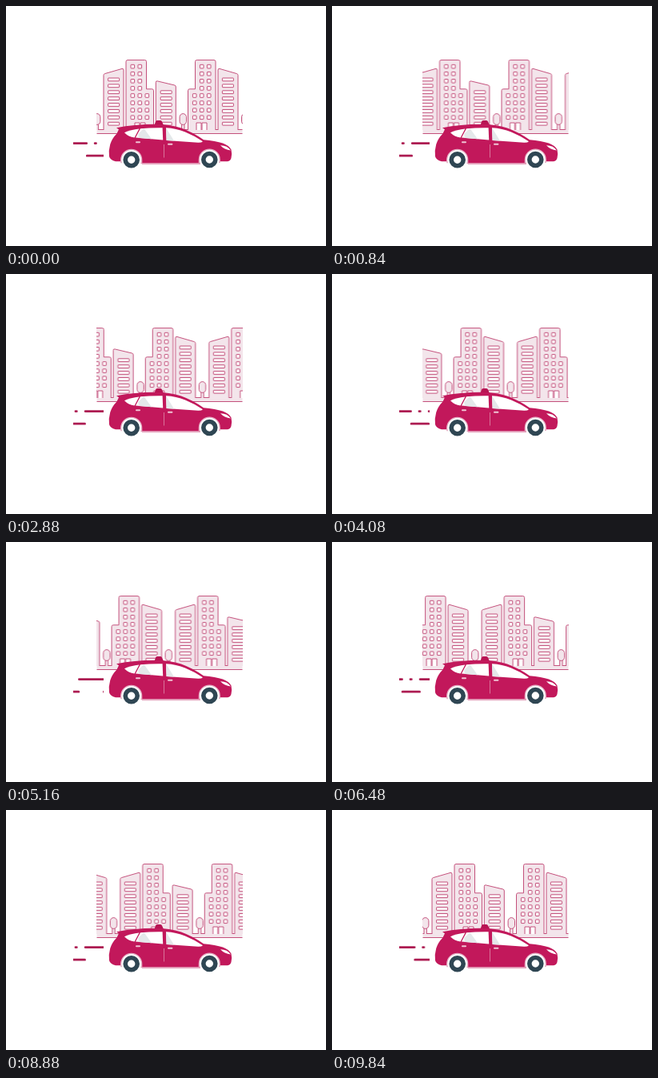
These frames come from a looping animation (400 px wide and 300 px high, 9.88 s). An HTML page without scripts:

```html
<!DOCTYPE html>
<html lang="en">
<head>
<meta charset="utf-8">
<title>Taxi in the city</title>
<style>
  html, body { margin: 0; width: 100%; height: 100%; overflow: hidden; background: #fff; }
  svg { display: block; width: 100vw; height: 100vh; }
  .ink { fill: #f3e5eb; stroke: #c4517c; stroke-width: 1; stroke-linejoin: round; }
  .pane { fill: #fff; stroke: #c4517c; stroke-width: 1; }
  .dash { fill: #ad1c52; }

  /* 82 ticks of 120 ms, then a short last one */
  .city { animation: city 9.88s steps(82) infinite; }
  .wind { animation: wind 9.88s steps(82) infinite; }
  .rewind { animation: rewind 9.88s step-end infinite; }
  @keyframes city { 99.5951%, 100% { transform: translateX(-182.04px); } }
  @keyframes wind { 99.5951%, 100% { transform: translateX(-270.6px); } }
  @keyframes rewind {
    0% { transform: none; }
    20.6478% { transform: translateX(55px); }
    41.2955% { transform: translateX(110px); }
    60.7287% { transform: translateX(165px); }
    81.3765%, 100% { transform: translateX(220px); }
  }
</style>
</head>
<body>
<svg viewBox="0 0 400 300">
  <defs>
    <clipPath id="view"><rect x="113.5" y="60" width="182" height="101"/></clipPath>
    <clipPath id="trail"><rect x="84" y="165" width="37.7" height="28"/></clipPath>

    <rect id="bar" class="pane" x="5.6" y="90" width="14" height="3.8" rx=".5"/>
    <g id="bar2"><use href="#bar"/><use href="#bar" y="7.9"/></g>
    <g id="bar4"><use href="#bar2"/><use href="#bar2" y="15.8"/></g>

    <rect id="win" class="pane" x="6" y="73.3" width="4.6" height="4.6" rx=".5"/>
    <g id="win2"><use href="#win"/><use href="#win" y="9.1"/></g>
    <g id="win4"><use href="#win2"/><use href="#win2" y="18.2"/></g>
    <g id="win8"><use href="#win4"/><use href="#win4" y="36.4"/></g>

    <g id="slant">
      <path class="ink" d="M0 155V86.5Q0 85 1.5 84.6L23 78.4Q25 78 25 80V155"/>
      <use href="#bar4"/><use href="#bar4" y="31.6"/>
    </g>
    <g id="tower">
      <path class="ink" d="M0 155V69.5Q0 67.6 2 67.6H23.5Q25.5 67.6 25.5 69.5V103.8H32.5Q34.5 103.8 34.5 105.8V155"/>
      <use href="#win8"/><use href="#win8" x="9"/><use href="#win4" x="18" y="36.4"/>
      <path class="pane" d="M11 155V146H17V155M18 155V146H24V155"/>
    </g>
    <g id="low">
      <path class="ink" d="M0 155V95.5Q0 93.4 2 93.9L23.5 99Q25 99.4 25 101V155"/>
      <use href="#bar4" x=".3" y="15.8"/><use href="#bar2" x=".3" y="47.4"/>
    </g>
    <g id="tree" class="ink">
      <path d="M-1.7 155V147H1.7V155"/>
      <rect x="-4.2" y="134.6" width="8.4" height="13.8" rx="4.2"/>
    </g>

    <g id="block">
      <use href="#slant" x="122"/>
      <use href="#tower" x="150"/>
      <use href="#low" x="187.3"/>
      <use href="#tree" x="221.3"/>
      <use href="#tower" transform="translate(262 0) scale(-1 1)"/>
      <use href="#slant" transform="translate(290 0) scale(-1 1)"/>
      <use href="#tree" x="298.7"/>
    </g>

    <g id="gust" class="dash">
      <rect x="69" y="170.2" width="33" height="2.8" rx="1.2"/>
      <rect x="109.8" y="170.2" width="4" height="2.8" rx="1.2"/>
      <rect x="100" y="185.8" width="24" height="2.8" rx="1.2"/>
    </g>

    <g id="wheel">
      <path d="M-13.6 4V0A13.6 13.6 0 0 1 13.6 0V4Z" fill="#e7afc5"/>
      <circle r="12.3" fill="#fff"/>
      <circle r="7.5" fill="#fff" stroke="#2f4653" stroke-width="5.6"/>
    </g>
  </defs>

  <g clip-path="url(#view)">
    <path d="M113 154.5H296V159.5H113Z" fill="#f3e5eb"/>
    <path d="M113 154.5H296" stroke="#c4517c"/>
    <g class="city">
      <use href="#block" x="-185"/><use href="#block"/><use href="#block" x="185"/>
    </g>
    <path d="M113 159.5H296" stroke="#c4517c"/>
  </g>

  <g clip-path="url(#trail)">
    <g class="wind"><g class="rewind">
      <use href="#gust" x="-53"/><use href="#gust"/><use href="#gust" x="53"/><use href="#gust" x="106"/>
    </g></g>
  </g>

  <g>
    <path d="M168 194H243V198.3H170Z" fill="#e7afc5"/>
    <path d="M185.5 149L187 144.5Q187.4 143 189 143H193Q194.6 143 195 144.5L197 149Z" fill="#b81453"/>
    <path fill="#c2185b" d="M138 152.2Q160 148 186 147.8Q205 147.8 219 152.5Q234 158 247 167.2Q262 168.5 271 171.5Q279 174.5 281.5 179.5Q282.8 185 281.5 190Q280.5 194 277 194.2H266L243 196.2H168L144 194.2H137Q130 192.5 129 188Q128 181 130.2 173Q132.5 165.5 138.5 159.5L141 154.3Z"/>
    <path fill="#fff" d="M148 158.2Q156 154.4 166.4 153.4L160.6 164.4Q153 163.6 148 158.2Z"/>
    <path fill="#fff" d="M168 153.2Q180 152 195.6 152.2L196.2 167.6L162 164.6Z"/>
    <path fill="#fff" d="M200 152.2Q213 152.8 224 157.6Q236 162.6 246 169.2Q244.5 171 240 170.8L200.6 168Z"/>
    <path fill="#e4e8ea" d="M172.5 153L182 166.3L166 165L165 160Z"/>
    <path fill="#e4e8ea" d="M200 152.2L210 168.6L200.6 168Z"/>
    <path fill="#fff" d="M268 174.2Q276.5 174 280.8 180.4Q273 179.6 268 174.2Z"/>
    <path d="M197.5 173V189.5" stroke="#dc7fa2" stroke-width=".9"/>
    <path d="M163 170.3H167M203 172.7H207.4" stroke="#f0c5d5" stroke-width="2" stroke-linecap="round"/>
    <use href="#wheel" x="156.7" y="192.3"/>
    <use href="#wheel" x="254.3" y="192"/>
  </g>
</svg>
</body>
</html>
```
